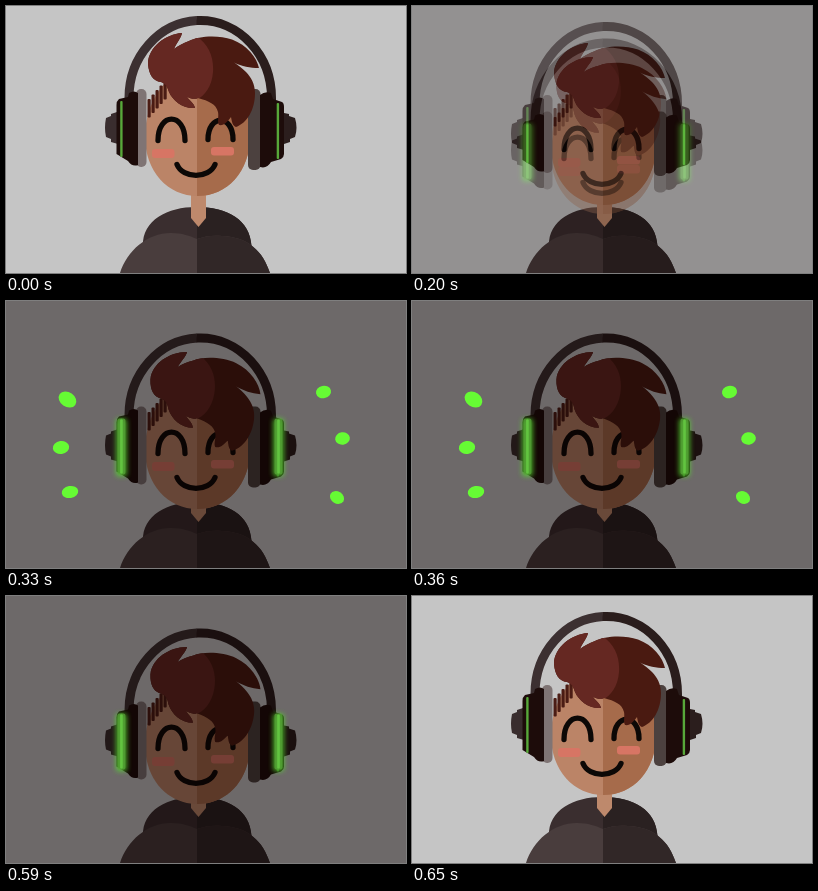
An HTML page that plays this animation: 400x267 px, repeating every 0.78 s.

```html
<!DOCTYPE html>
<html lang="en">
<head>
<meta charset="utf-8">
<title>Headphones</title>
<style>
html, body { margin: 0; width: 100%; height: 100%; overflow: hidden; background: #c5c5c5; }
svg { display: block; width: 100vw; height: 100vh; }
</style>
</head>
<body>
<svg viewBox="0 0 400 267" preserveAspectRatio="none">
  <defs>
    <filter id="glow" x="-200%" y="-30%" width="500%" height="160%"><feGaussianBlur stdDeviation="2.6"/></filter>
    <filter id="soft"><feGaussianBlur stdDeviation=".6"/></filter>
    <clipPath id="rightHalf"><rect x="191" width="209" height="300"/></clipPath>
    <path id="hairShape" d="M176 27C160 28 142 41 142 58C143 69 147 75 155 76C160 78 161 80 163 86C167 95 177 103 189 102C188 97 184 95 181 91C184 92 188 94 192 92C203 95 210 98 212 106C213 111 211 115 213 119C218 120 221 116 225 111C226 117 227 120 230 121C241 117 249 104 249 87C249 78 245 71 240 66C236 62 232 59 228 56.500C236 60.500 244 62 253 62C251 52 241 39 226 33.500C212 28.500 192 30 183 35C177 37 172 40 168 43C170 38 175 32 176 27Z"/>
    <clipPath id="hairClip"><use href="#hairShape"/></clipPath>
    <path id="head" d="M139 130C139 110 146 92 159 77H225C238 92 244 110 244 130C244 166 221 190 191.500 190C162 190 139 166 139 130Z"/>
    <path id="hood" d="M137 240C136 214 162 201 190 201C222 201 244 214 245.500 240V267H137Z"/>
    <path id="body" d="M114 267C121 245 141 227 165 227C176 227 184 230 191 233C199 230 208 229 216 230C242 231 257 245 264 267Z"/>
  </defs>
  <g id="dark"></g>
  <g id="light"></g>
  <g id="dots" fill="#66fb34"></g>
</svg>
<script>
const LOOP = 780;
const el = id => document.getElementById(id);

const bar = (x, y, w, h, fill, r = 0, extra = '') =>
  `<rect x="${x}" y="${y}" width="${w}" height="${h}" rx="${r}" fill="${fill}" ${extra}/>`;
const shape = (d, fill) => `<path d="${d}" fill="${fill}"/>`;
const line = (d, color, width, cap = 'round') =>
  `<path d="${d}" fill="none" stroke="${color}" stroke-width="${width}" stroke-linecap="${cap}"/>`;
const shift = (y, content) => `<g transform="translate(0 ${y})">${content}</g>`;
const twoTone = (ref, left, right) =>
  `<use href="#${ref}" fill="${left}"/><use href="#${ref}" fill="${right}" clip-path="url(#rightHalf)"/>`;

const torso = () =>
  twoTone('hood', '#3a2e2f', '#2a2121') + twoTone('body', '#493d3d', '#312727') +
  shape('M185 180H200V212L192.500 221L185 212Z', '#be896c');

const band = () => `<g filter="url(#soft)">` +
  line('M123 96V92A71.500 77.500 0 0 1 191 14.600', '#3c3031', 9, 'butt') +
  line('M190.500 14.600H194.500A71 77.500 0 0 1 265.500 92V96', '#2a1d1c', 9, 'butt') + '</g>';

const cups = () => `<g filter="url(#soft)">` +
  bar(130, 83, 10.5, 78, '#7f7474', 5) +
  shape('M111 106L105 108V110L100 112Q98 122 100 131L105 133V136L112 138Z', '#392d2e') +
  shape('M132 87Q128 84 123 87L122 91L113 93Q110.500 95 110.500 99V148L122 155Q126 161 132 159Z', '#1d0c0a') +
  bar(242, 83, 12.5, 81, '#4c413f', 5) +
  shape('M278 107L283 108V110L289 112Q292 122 289 131L284 133V136L278 138Z', '#2b1e1d') +
  shape('M254 89Q259 85 265 87L267 93L276 96Q278 97 278 101V148Q278 151 275 153L265 156Q261 163 254 161Z', '#1d0c0a') +
  '</g>' + bar(114.2, 95, 2.4, 56, '#58a83a', 1) + bar(270.7, 97, 2.4, 56, '#58a83a', 1);

const face = () => {
  let s = twoTone('head', '#bb8467', '#a66b4b');
  for (let i = 0; i < 5; i++) s += bar(141.5 + i * 4, 93 - i * 4.5, 3.2, 18.5, '#4b1c14', 1);
  return s + `<g filter="url(#soft)">` +
    bar(146, 143, 22.5, 9, '#d77564', 3) + bar(205, 141, 23, 8.5, '#d77564', 3) +
    line('M152 134.500C152 106 179 106 179 134.500', '#0c0806', 5.3) +
    line('M202 133.500C202 108 227 108 227 133.500', '#0c0806', 5.3) +
    line('M171 158.500C177 173 203 173 209 158.500', '#0c0806', 5.3) + '</g>';
};

const hair = () =>
  '<use href="#hairShape" fill="#4a1a11"/>' +
  '<g clip-path="url(#hairClip)">' +
  shape('M130 20H180L190 30C203 38 208 52 207 66C206 80 199 90 190 94L192 110H130Z', '#652822') + '</g>';

// Each part drops by its own amount; the hair also tilts.
const figure = ({ phones, head, hairY, tilt }) =>
  bar(0, 0, 400, 267, '#c5c5c5') + torso() + shift(phones, band()) +
  shift(head, face()) + shift(phones, cups()) +
  `<g transform="translate(0 ${hairY}) rotate(${tilt} 195 80)">${hair()}</g>`;

const glow = () => [115.4, 272.5].map(x =>
  bar(x - 5.5, 95, 11, 58, '#56d932', 3, 'filter="url(#glow)" opacity=".75"') +
  bar(x - 4, 95, 8, 56, '#55a237', 2, 'opacity=".75"') +
  bar(x - 1.3, 96, 2.6, 54, '#62c440', 1)).join('');

const poses = {
  up: { phones: 0, head: 0, hairY: 0, tilt: 0 },
  mid: { phones: 6, head: 9, hairY: 10, tilt: 0 },
  down: { phones: 22.5, head: 18, hairY: 25.5, tilt: 5.5 }
};

// x, y, rx, ry, angle
const dots = [
  [61.5, 98.5, 9.5, 7.3, 35], [55, 146.5, 8.2, 6.5, -8], [64, 191, 8.3, 6, -10],
  [317.5, 91, 7.6, 6.2, -12], [336.5, 137.5, 7.4, 6.2, -8], [331, 196.5, 7.4, 6, 30]
];

el('dark').innerHTML = figure(poses.down) +
  bar(0, 0, 400, 267, '#090100', 0, 'opacity=".47"') + shift(poses.down.phones, glow());
el('light').innerHTML = `<g id="up">${figure(poses.up)}</g><g id="mid">${figure(poses.mid)}</g>`;
el('dots').innerHTML = dots.map(([x, y, rx, ry, a]) =>
  `<ellipse rx="${rx}" ry="${ry}" transform="translate(${x} ${y}) rotate(${a})"/>`).join('');

// start time, light pose, light opacity, dot opacity
const steps = [
  [0, 'up', 1, 0], [100, 'mid', 1, 0], [200, 'mid', .44, 0], [230, 'mid', 0, 0],
  [260, 'mid', 0, .5], [290, 'mid', 0, 1], [360, 'mid', 0, 1], [490, 'mid', 0, 1],
  [560, 'mid', 0, .5], [590, 'mid', 0, 0], [620, 'mid', .44, 0], [650, 'mid', 1, 0]
];

function draw() {
  const t = performance.now() % LOOP;
  const [, pose, light, dot] = steps.findLast(s => s[0] <= t);
  el('up').style.display = pose === 'up' ? '' : 'none';
  el('mid').style.display = pose === 'mid' ? '' : 'none';
  el('light').style.opacity = light;
  el('dots').style.opacity = dot;
  requestAnimationFrame(draw);
}
draw();
</script>
</body>
</html>
```
